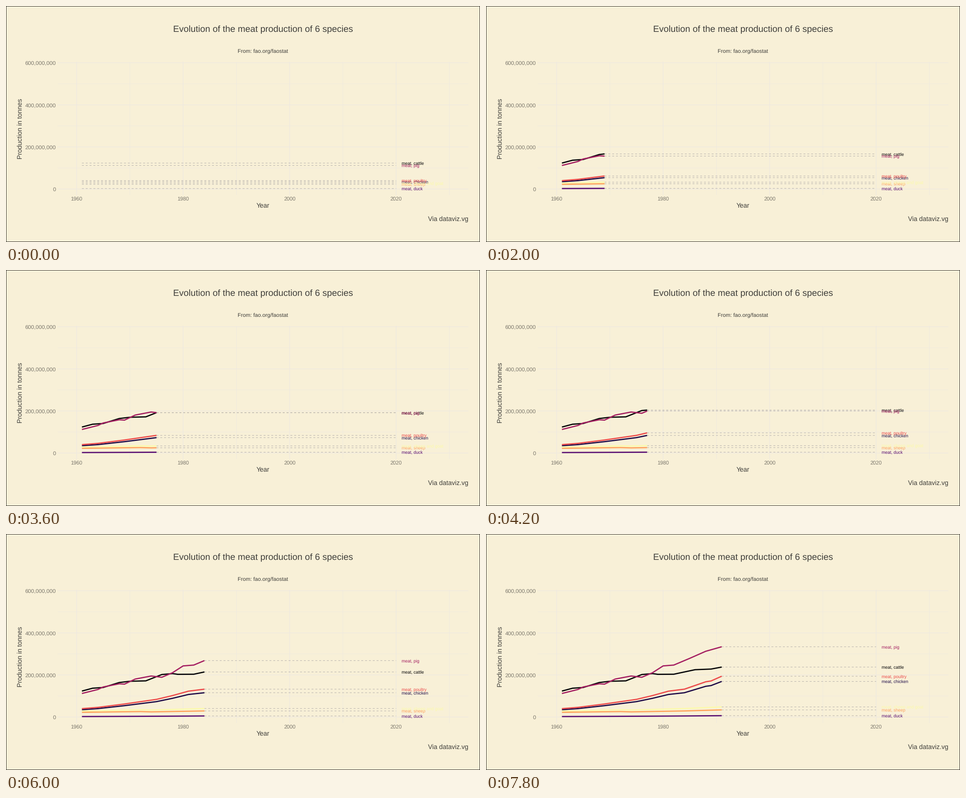
A matplotlib script that plays this animation: 1058x529 px, repeating every 8 s.

```python
import numpy as np
import matplotlib.pyplot as plt
from matplotlib.animation import FuncAnimation
from matplotlib.patches import Rectangle

W, H, DPI = 1058, 529, 100
PT = 72 / DPI
FRAMES, STEP_MS = 40, 200
BG, GRID, DASH = "#f8f0d7", "#ede8e2", "#b5b0ac"
INK, TICK = "#403f3b", "#7c786d"

plt.rcParams["font.family"] = "Liberation Sans"
plt.rcParams["text.hinting"] = "none"
plt.rcParams["lines.scale_dashes"] = False

YEARS = np.arange(1961, 1992)
AGE = YEARS - YEARS[0]
# Each year lands on a whole animation step; steps in between are interpolated.
YEAR_STEP = np.round(AGE * 74 / 57)


def px(year):
    return 157.6 + (year - 1960) * 11.887


def py(mt):
    return 410.3 - mt * 0.4717


def trend(turns):
    """Straight runs between turning points {year: million tonnes}."""
    return np.interp(YEARS, list(turns), list(turns.values()))


cattle = trend({1961: 123.5, 1963: 137, 1965: 140.5, 1968: 164, 1970: 170,
                1973: 172, 1976: 202, 1978: 206.5, 1979: 203, 1982: 203.5,
                1986: 225, 1989: 228, 1991: 237.5})
pig = trend({1961: 112, 1964: 131, 1965: 143, 1968: 158, 1969: 156.5,
             1971: 180.5, 1974: 195, 1976: 189, 1978: 210.5, 1980: 243,
             1982: 247, 1985: 279, 1988: 312.5, 1991: 334})
poultry = trend({1961: 40, 1964: 46, 1969: 62, 1975: 84, 1978: 102,
                 1981: 123, 1984: 132.5, 1988: 167.5, 1989: 171.5, 1991: 194})
sheep = trend({1961: 22.5, 1972: 26, 1974: 24.5, 1984: 29, 1991: 34})
chicken = 0.872 * poultry
goat = 6 * 1.029 ** AGE
duck = 2.4 * 1.034 ** AGE

SERIES = [
    ("meat, cattle", cattle, "#060608"),
    ("meat, chicken", chicken, "#1f0c48"),
    ("meat, duck", duck, "#5a0f70"),
    ("meat, pig", pig, "#a52062"),
    ("meat, poultry", poultry, "#ec4b4b"),
    ("meat, sheep", sheep, "#ffa35c"),
    ("meat, sheep and goat", sheep + goat, "#fcfaac"),
]

fig = plt.figure(figsize=(W / DPI, H / DPI), dpi=DPI, facecolor=BG)
ax = fig.add_axes([0, 0, 1, 1])
ax.set_xlim(0, W)
ax.set_ylim(H, 0)
ax.axis("off")


def text(x, y, s, size, color=INK, ha="center", **kw):
    return ax.text(x, y, s, fontsize=size * PT, color=color, ha=ha,
                   va="baseline", **kw)


def line(xs, ys, color, width, **kw):
    return ax.plot(xs, ys, color=color, lw=width * PT, snap=False, **kw)[0]


def grid_line(xs, ys, major):
    line(xs, ys, GRID, 1.1 if major else 0.7, zorder=1)


for year in range(1960, 2031, 10):
    major = year % 20 == 0
    grid_line([px(year)] * 2, [125.5, 423.5], major)
    if major:
        text(px(year), 436, str(year), 11.8, TICK)
for mt in range(0, 601, 100):
    major = mt % 200 == 0
    grid_line([116, 1031.5], [py(mt)] * 2, major)
    if major:
        text(111.7, py(mt) + 4.4, f"{mt * 10**6:,}", 12.4, TICK, "right")

text(573.7, 58, "Evolution of the meat production of 6 species", 20.2)
text(573.7, 106, "From: fao.org/faostat", 12.1)
text(573.7, 451.6, "Year", 14.6)
text(1031.7, 482.3, "Via dataviz.vg", 14.5, ha="right")
text(36.8, 274.7, "Production in tonnes", 14.9, rotation=90,
     rotation_mode="anchor")
ax.add_patch(Rectangle((0.5, 0.5), W - 1, H - 1, fill=False, ec="#2a2926",
                       lw=PT, snap=False, zorder=5))

paths, guides, labels = [], [], []
for name, values, color in SERIES:
    guides.append(line([], [], DASH, 1.05, zorder=2, dash_capstyle="butt",
                       dashes=(4.27 * PT, 4.27 * PT)))
    paths.append(line([], [], color, 2.8, zorder=3, solid_capstyle="butt"))
    labels.append(text(882.8, 0, name, 9.7, color, "left", zorder=4))


def draw(step):
    now = np.interp(step, YEAR_STEP, YEARS)
    past = YEARS < now
    for (_, values, _), path, guide, label in zip(SERIES, paths, guides, labels):
        head = np.interp(now, YEARS, values)
        y = py(head)
        path.set_data(px(np.append(YEARS[past], now)),
                      py(np.append(values[past], head)))
        guide.set_data([px(now), px(2020)], [y, y])
        label.set_y(y + 3.7)
    return paths + guides + labels


anim = FuncAnimation(fig, draw, frames=FRAMES, interval=STEP_MS,
                     repeat=True, repeat_delay=0, blit=False)
plt.show()
```
